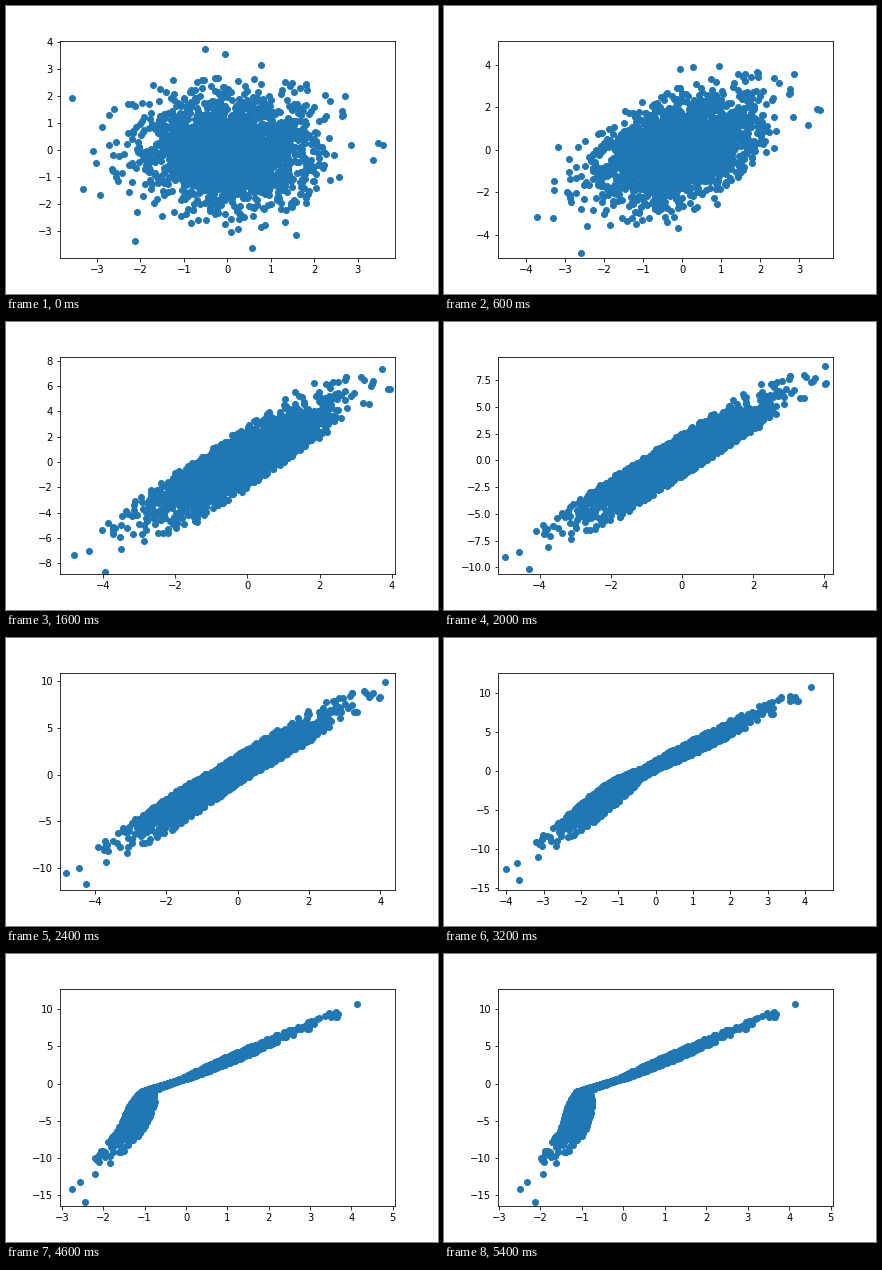
These frames come from a looping animation (432 by 288 pixels, 5.5 s). A matplotlib script:

```python
import numpy as np
import matplotlib.pyplot as plt
from matplotlib.animation import FuncAnimation

FRAMES = 55

# Lone points around the starting cloud
RIM = [(3.52, 0.15), (3.42, 0.25), (3.3, -0.4), (2.7, 1.98), (0.8, 3.1),
       (0, 3.52), (-0.45, 3.7), (-3.5, 1.95), (-3.05, 0), (-3.3, -1.4),
       (-2.9, -1.6), (-2.15, -3.3), (0.5, -3.58), (1.5, -3.1)]

# Bent line that the cloud settles on
SPINE_Y = [-15, -6, -1, 0.8, 11.4]
SPINE_X = [-2.4, -1.25, -1.0, 0, 4.4]

rng = np.random.default_rng(4)
cloud = rng.normal(size=(2000, 2))
cloud = cloud[np.hypot(*cloud.T) < 3.1]
a, b = np.vstack([cloud, RIM]).T

# Coordinates along and across the final line
s = 0.77 * a + 0.64 * b
e = -0.64 * a + 0.77 * b


def ease(frame, start, end):
    u = np.clip((frame - start) / (end - start), 0, 1)
    return u * u * (3 - 2 * u)


def points(frame):
    grow = ease(frame, -4, 30)
    bend = ease(frame, 16, 54)
    pinch = ease(frame, 18, 46)

    # Far points are drawn in towards the line
    across = e / (1 + 0.15 * (grow - ease(0, -4, 30)) * e ** 2)
    y = (0.55 + 2.65 * grow) * s + 0.8 * (1 - grow) * across
    y -= 0.27 * pinch * np.minimum(s, 0) ** 2

    line = (0.77 + 0.52 * ease(frame, 0, 24)) * s - 0.25 * ease(frame, 0, 12)
    spine = (1 - bend) * line + bend * np.interp(y, SPINE_Y, SPINE_X)

    width = 0.66 - 0.42 * ease(frame, 10, 44)
    width *= 1 - 0.75 * pinch * np.exp(-(s / 0.55) ** 2)
    width *= np.where(s > 0, 1 - 0.3 * pinch, 1)
    x = spine - width * (across - 0.15 * pinch * across ** 2)
    return np.column_stack([x, y])


def set_limits(frame):
    left = -3.85 - 1.35 * ease(frame, 0, 10) + 2.18 * ease(frame, 18, 48)
    right = 3.85 + 1.2 * ease(frame, 4, 46)
    ax.set_xlim(left, right)
    ax.set_ylim(-3.9 - 12.55 * ease(frame, -2, 40),
                3.9 + 8.85 * ease(frame, -3, 35))


fig = plt.figure(figsize=(6, 4), dpi=72)
fig.subplots_adjust(left=0.125, right=0.9, bottom=0.125, top=0.88)
ax = fig.add_subplot()
dots = ax.scatter(*points(0).T, color="#1f77b4")


def draw(frame):
    dots.set_offsets(points(frame))
    set_limits(frame)
    return [dots]


anim = FuncAnimation(fig, draw, frames=FRAMES, interval=100,
                     init_func=lambda: draw(0), repeat=True, repeat_delay=0)
plt.show()
```
